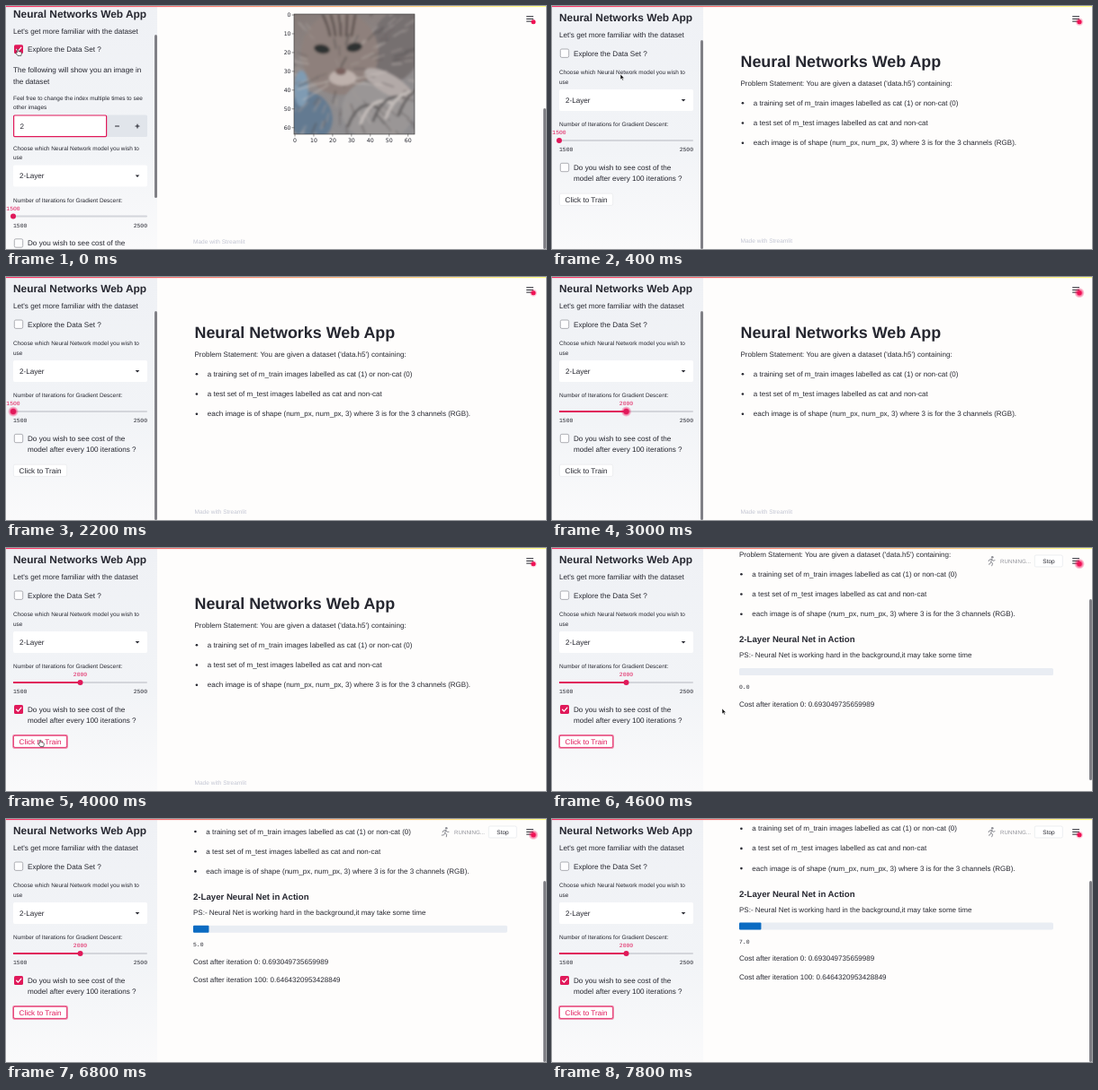
An HTML page that plays this animation: 600x271 px, repeating every 8000 ms.

```html
<!DOCTYPE html>
<html lang="en">
<head>
<meta charset="utf-8">
<title>Neural Networks Web App</title>
<style>
html, body { margin: 0; width: 100%; height: 100%; overflow: hidden; background: #fefdfc; }
svg { display: block; width: 100vw; height: 100vh; }
text { font-family: "Liberation Sans", Arial, sans-serif; text-rendering: geometricPrecision; white-space: pre; }
.mono { font-family: "Liberation Mono", monospace; }
.tick { font-family: "DejaVu Sans", sans-serif; }
.bold { font-weight: 700; }
</style>
</head>
<body>
<svg id="stage" viewBox="0 0 600 271" preserveAspectRatio="none"></svg>
<script>
const LOOP = 8000, STEP = 200;
const INK = '#262730', RED = '#e0195a', GREY = '#808086', PAGE = '#fefdfc';

// Keyframes: [time, ...values]
const POINTER = [[0, 13, 48], [200, 16, 52], [400, 76, 76], [900, 85, 102], [1100, 85, 104],
  [1400, 120, 132], [2000, 9, 148], [3000, 83, 150], [3600, 13, 178], [4000, 38, 214],
  [4200, 40, 214], [4600, 189, 179], [5000, 240, 150]];
const SLIDER = [[2200, 1500], [2800, 2000]];
const SCROLL = [[4200, 0], [4400, 79], [4800, 79], [5000, 94.3], [6800, 94.3], [7000, 97.6]];
const PERCENT_AT = [5000, 5400, 6000, 6400, 6800, 7200, 7600];

function at(keys, t) {
  if (t <= keys[0][0]) return keys[0].slice(1);
  const i = keys.findIndex(k => k[0] > t);
  if (i < 0) return keys.at(-1).slice(1);
  const a = keys[i - 1], b = keys[i], p = (t - a[0]) / (b[0] - a[0]);
  return a.slice(1).map((v, n) => v + (b[n + 1] - v) * p);
}

function seeded(seed) {
  return () => (seed = seed * 16807 % 2147483647) / 2147483647;
}

// y is the middle of the line
const text = (s, x, y, size = 8, { fill = INK, cls = '', anchor = 'start' } = {}) =>
  `<text x="${x}" y="${y + size * .35}" font-size="${size}" fill="${fill}" class="${cls}" text-anchor="${anchor}">${s}</text>`;
const rect = (x, y, w, h, fill, extra = '') =>
  `<rect x="${x}" y="${y}" width="${w}" height="${h}" fill="${fill}" ${extra}/>`;
const path = (d, stroke, width, extra = '') =>
  `<path d="${d}" fill="none" stroke="${stroke}" stroke-width="${width}" stroke-linecap="round" stroke-linejoin="round" ${extra}/>`;
const circle = (x, y, r, fill, extra = '') => `<circle cx="${x}" cy="${y}" r="${r}" fill="${fill}" ${extra}/>`;
const ellipse = (x, y, rx, ry, fill, turn = 0) =>
  `<ellipse cx="${x}" cy="${y}" rx="${rx}" ry="${ry}" fill="${fill}" transform="rotate(${turn} ${x} ${y})"/>`;
const mono = (s, x, y, opts) => text(s, x, y, 6.4, { cls: 'mono', ...opts });
const label = (s, x, y) => text(s, x, y, 6.45);
const body = (s, x, y) => text(s, x, y, 8.15);

const DEFS = `<defs>
  <linearGradient id="side" x2="0" y2="1"><stop stop-color="#eff1f5"/><stop offset=".6" stop-color="#f2f4f7"/><stop offset="1" stop-color="#fafafb"/></linearGradient>
  <linearGradient id="top"><stop stop-color="#f63366"/><stop offset="1" stop-color="#fffd80"/></linearGradient>
  <linearGradient id="fur" x2=".3" y2="1"><stop stop-color="#857a77"/><stop offset=".5" stop-color="#8f8988"/><stop offset="1" stop-color="#8e8d90"/></linearGradient>
  <radialGradient id="glow"><stop stop-color="#f4115c"/><stop offset=".45" stop-color="#f4115c" stop-opacity=".75"/><stop offset="1" stop-color="#f4115c" stop-opacity="0"/></radialGradient>
  <clipPath id="frame"><rect x="320" y="9" width="134" height="134"/></clipPath>
  <filter id="soft"><feGaussianBlur stdDeviation="1.4"/></filter>
</defs>`;

function checkbox(y, on) {
  return on
    ? rect(9, y - 5, 10, 10, RED, 'rx="1.6"') + path(`M11.6 ${y + .2}l1.8 1.9 3.4-4`, '#fff', 1.3)
    : rect(9.3, y - 4.7, 9.4, 9.4, '#fdfdfe', 'rx="1.6" stroke="#9b9ca3" stroke-width=".8"');
}

function select(y, focused) {
  return rect(8.6, y - 11.4, 147.8, 22.8, '#fff', `rx="1.4" stroke="${focused ? RED : '#fff'}" stroke-width="1.2"`)
    + body('2-Layer', 15, y) + `<path d="M143.7 ${y - 1}h4.6l-2.3 2.4z" fill="${INK}"/>`
    + (focused ? path(`M43.6 ${y - 4.5}v9`, INK, .6) : '');
}

function slider(y, value, held) {
  const x = 8 + (value - 1500) * .149;
  return rect(8, y - 1, 149, 2, '#d3d5db', 'rx="1"') + rect(8, y - 1, x - 8, 2, RED)
    + (held ? circle(x, y, 6, 'url(#glow)') : '') + circle(x, y, 3, RED)
    + mono(value, x, y - 9, { fill: RED, anchor: 'middle' })
    + mono('1500', 8, y + 10) + mono('2500', 157, y + 10, { anchor: 'end' });
}

function trainButton(focused) {
  const edge = focused ? `stroke="${RED}" stroke-width=".8"` : 'stroke="#e4e6ea" stroke-width=".6"';
  return (focused ? rect(7.2, 207.9, 61.6, 15.8, '#ee7fa3', 'rx="2"') : '')
    + rect(8.4, 209.2, 59.2, 13.2, '#fff', `rx="1.6" ${edge}`)
    + text('Click to Train', 38, 216, 8.15, { anchor: 'middle', fill: focused ? RED : INK });
}

function modelControls(y, t, value) {
  return label('Choose which Neural Network model you wish to', 8, y - 31) + label('use', 8, y - 20.5)
    + select(y, t >= 1000 && t < 2200) + label('Number of Iterations for Gradient Descent:', 8, y + 27)
    + slider(y + 45, value, t >= 2200 && t < 3400)
    + checkbox(y + 75, t >= 3600)
    + body('Do you wish to see cost of the', 24, y + 75) + body('model after every 100 iterations ?', 24, y + 87);
}

function sidebar(t, exploring) {
  const up = exploring ? 4.5 : 0;
  let s = rect(0, 0, 168, 271, 'url(#side)')
    + text('Neural Networks Web App', 8, 13.3 - up, 11.9, { cls: 'bold' })
    + body('Let\'s get more familiar with the dataset', 8, 32.3 - up)
    + checkbox(52.7 - up, t < STEP) + body('Explore the Data Set ?', 24, 52.7 - up);
  if (exploring) {
    s += body('The following will show you an image in', 8, 71.5) + body('the dataset', 8, 84)
      + label('Feel free to change the index multiple times to see', 8, 103) + label('other images', 8, 113)
      + rect(111, 121.5, 46, 24.5, '#e1e5eb', 'rx="1.6"')
      + rect(8.6, 122, 103, 23.6, '#fff', `rx="1" stroke="${RED}" stroke-width="1.2"`)
      + body('2', 15.5, 134) + path('M121.5 134h4M144 134h4M146 132v4', INK, 1.1)
      + modelControls(189.5, t, 1500) + rect(165, 32, 3, 182, GREY, 'rx="1.5"');
  } else {
    const value = Math.round(at(SLIDER, t)[0] / 10) * 10;
    s += modelControls(105, t, value) + trainButton(t >= 4000);
    if (t < 3800) s += rect(165, 38, 3, 233, GREY, 'rx="1.5"');
  }
  return s;
}

// Strokes fanning out from the face give the look of fur
function furStrokes() {
  const rand = seeded(11), shades = ['#4f4a4a', '#6a6262', '#b9b2af', '#a39b98'];
  let s = '';
  for (let i = 0; i < 130; i++) {
    const x = 320 + rand() * 134, y = 9 + rand() * 134, length = 6 + rand() * 9;
    const angle = Math.atan2(y - 70, x - 371);
    s += path(`M${x} ${y}l${Math.cos(angle) * length} ${Math.sin(angle) * length}`,
      shades[Math.floor(rand() * shades.length)], 1 + rand() * 1.4, 'opacity=".55"');
  }
  return s;
}

// Soft stand-in for the plotted photograph
function plot() {
  let s = `<g clip-path="url(#frame)">${rect(320, 9, 134, 134, 'url(#fur)')}<g filter="url(#soft)">`
    + ellipse(433, 45, 30, 42, '#766f70', 20) + ellipse(371, 53, 43, 46, '#8e807b')
    + ellipse(338, 123, 24, 28, '#647a91', -25) + ellipse(328, 92, 8, 20, '#7f9bb3')
    + ellipse(413, 116, 40, 35, '#9a9696') + ellipse(425, 87, 30, 11, '#b3aaa8', 30)
    + furStrokes()
    + ellipse(374, 80, 15, 9, '#beb1ac') + ellipse(351, 48, 9, 5, '#2f3133', 12)
    + ellipse(387, 46, 9, 5, '#2f3133', -12) + ellipse(372, 73, 6, 4, '#79605d');
  for (let i = 0; i < 5; i++) {
    s += path(`M${352 + i * 9} 10q${6 - i * 2} 12 ${8 - i * 3} 23`, '#564c4a', 2.4)
      + path(`M${380 + i * 14} ${134 - i * 3}q12 -32 34 -${20 + i * 3}`, i % 2 ? '#c6bfbc' : '#646061', 3);
  }
  s += path('M358 84L324 93M358 88L330 105M386 82L423 73M386 86L420 88', '#d2c9c5', .8) + '</g></g>';
  s += rect(320, 9, 134, 134, 'none', 'stroke="#333" stroke-width=".6"');
  for (let i = 0; i < 7; i++) {
    const d = i * 20.95, opts = { cls: 'tick' };
    s += path(`M317.8 ${10 + d}h2.2M${321 + d} 143v2.2`, '#333', .5)
      + text(i * 10, 316.5, 10 + d, 6.2, { ...opts, anchor: 'end' })
      + text(i * 10, 321 + d, 150, 6.2, { ...opts, anchor: 'middle' });
  }
  return s;
}

function article(t) {
  const training = t >= 4400, x = training ? 208 : 209.5;
  const up = at(SCROLL, t)[0], line = (s, y, dx = 0) => text(s, x + dx, y - up, 8.02);
  let s = text('Neural Networks Web App', x, 62 - up, 17.9, { cls: 'bold' })
    + line('Problem Statement: You are given a dataset (\'data.h5\') containing:', 86);
  ['a training set of m_train images labelled as cat (1) or non-cat (0)',
   'a test set of m_test images labelled as cat and non-cat',
   'each image is of shape (num_px, num_px, 3) where 3 is for the 3 channels (RGB).'
  ].forEach((item, i) => {
    const y = 108 + i * 22.2;
    s += circle(x + 2.4, y - up + .3, 1.3, INK) + line(item, y, 14.3);
  });
  if (training) {
    const percent = PERCENT_AT.filter(p => t >= p).length;
    s += text('2-Layer Neural Net in Action', x, 181 - up, 9.65, { cls: 'bold' })
      + line('PS:- Neural Net is working hard in the background,it may take some time', 198.5)
      + rect(x, 213 - up, 349, 8, '#e9edf3', 'rx="1.6"')
      + (percent ? rect(x, 213 - up, 3.49 * percent, 8, '#0b6bc2', 'rx="1"') : '')
      + mono(percent.toFixed(1), x, 234 - up)
      + line('Cost after iteration 0: 0.693049735659989', 253);
    if (t >= 6800) s += line('Cost after iteration 100: 0.6464320953428849', 273.4);
    s += rect(597, at([[4800, 57], [5000, 69]], t)[0], 3, 202, GREY, 'rx="1.5"');
  }
  return s;
}

function status(t) {
  const alpha = t >= 4200 ? 1 : t >= 1400 && t < 1600 ? .3 : 0;
  if (!alpha) return '';
  const swing = (t / STEP) % 2 ? 1.2 : 0;
  return `<g opacity="${alpha}">` + circle(489.3, 10.2, 1.3, '#8b8c93')
    + path(`M488.6 12.3l-.9 3.3 2 1.5-${.4 + swing / 2} 2.7M487.6 15.7l-1 2.1-${2.4 - swing} .3M488.5 12.4l-2.6 .7-.7 1.6M488.8 12.5l1.3 1.8 1.9-${swing / 2}`, '#8b8c93', 1)
    + text('RUNNING...', 498, 14.5, 6.2, { fill: '#94959c' })
    + rect(536.3, 8, 31, 13, '#fff', 'rx="1.6" stroke="#e0e2e7" stroke-width=".6"')
    + text('Stop', 552, 14.5, 6.5, { anchor: 'middle' }) + '</g>';
}

function menu(t) {
  const pulse = Math.abs(Math.sin(t / 1867 * Math.PI));
  return path('M578.6 11.7h7M578.6 14.4h7M578.6 17.1h7', INK, 1)
    + circle(586, 17.7, 3 + 3 * pulse, 'url(#glow)', `opacity="${pulse}"`) + circle(586, 17.7, 2.5, '#f01255');
}

function pointer(t) {
  if (t >= 5000 || (t >= 2200 && t < 3200)) return '';
  const [x, y] = at(POINTER, t);
  const hand = t < STEP || (t >= 3600 && t < 4400);
  return `<g transform="translate(${x} ${y})">` + (hand
    ? '<path d="M-.7 .5q.7-1 1.4 0v2l3 .8q.9.3.6 1.5l-.6 2.7h-3.6l-2.2-3q0-1.1 1.4-.4z" fill="#fff" stroke="#111" stroke-width=".6"/>'
    : '<path d="M0 0v6l1.4-1.2 1 2.2 1-.5-1-2.1h2z" fill="#111" stroke="#fff" stroke-width=".5"/>') + '</g>';
}

function scene(t) {
  const exploring = t < 400;
  const footer = exploring ? [208, 263] : t < 4400 ? [209.5, 262] : t >= 5000 && t < 6800 ? [208, 262] : null;
  return DEFS + rect(0, 0, 600, 271, PAGE)
    + (exploring ? plot() + rect(597, 114, 3, 157, GREY, 'rx="1.5"') : article(t))
    + (footer ? text('Made with Streamlit', ...footer, 6.55, { fill: '#c3c6d3' }) : '')
    + sidebar(t, exploring) + rect(0, 0, 600, 1.1, 'url(#top)')
    + status(t) + menu(t) + pointer(t);
}

const stage = document.getElementById('stage');
let shown = -1;
function tick() {
  const t = Math.floor(performance.now() % LOOP / STEP) * STEP;
  if (t !== shown) stage.innerHTML = scene(shown = t);
  requestAnimationFrame(tick);
}
tick();
</script>
</body>
</html>
```
